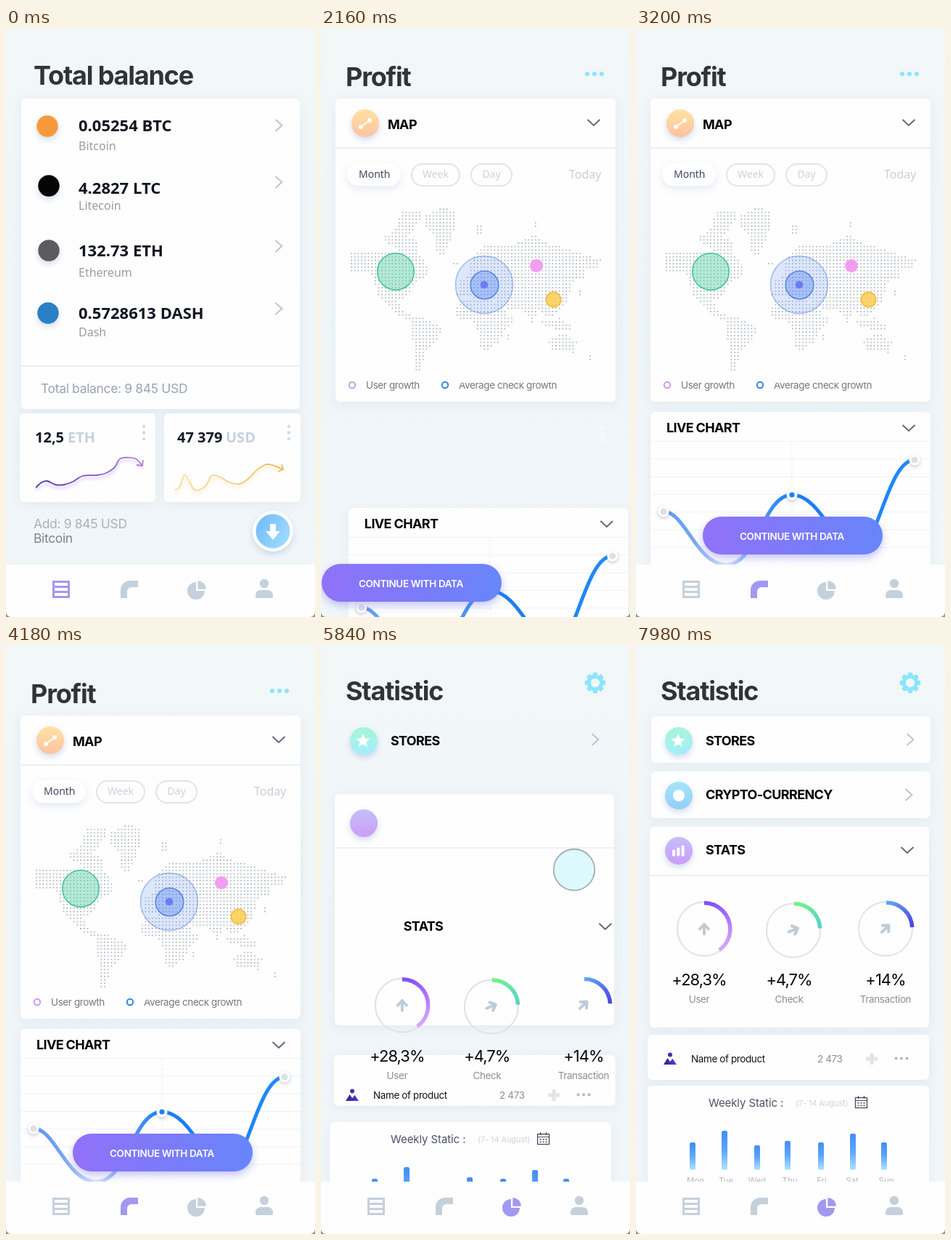
Write an HTML page with a canvas that moves like this. It is 426 px wide and 810 px high and loops after 8000 ms.

```html
<!DOCTYPE html>
<html lang="en">
<head>
<meta charset="utf-8">
<title>Wallet dashboard</title>
<style>
html, body { margin: 0; width: 100%; height: 100%; overflow: hidden; background: #8a8d8f; }
canvas { display: block; border-radius: 0 0 7px 7px; }
</style>
</head>
<body>
<canvas id="stage" width="426" height="810"></canvas>
<script>
const W = 426, H = 810, LOOP = 8000, TAU = Math.PI * 2;
const screen = document.getElementById('stage').getContext('2d');
const layer = document.createElement('canvas');
layer.width = W;
layer.height = H;
const c = layer.getContext('2d');

const INTER = 'Inter, "Liberation Sans", sans-serif';
const NOTO = '"Noto Sans", "Open Sans", sans-serif';
const MUTED = '#c5d0dd', ACTIVE = '#a298f2', CHEVRON = '#5f6b7b';

const clamp = v => Math.min(1, Math.max(0, v));
const ramp = (t, from, to) => clamp((t - from) / (to - from));
// Share of the way still to go on an ease-out slide
const remaining = (t, start) => (1 - ramp(t, start, start + 310)) ** 3;

// y is the middle of the capital letters
function text(s, x, y, size, color, { font = INTER, weight = 400, gap = 0, align = 'left' } = {}) {
  c.font = `${weight} ${size}px ${font}`;
  c.letterSpacing = gap + 'px';
  c.textAlign = align;
  c.fillStyle = color;
  c.fillText(s, x, y + size * 0.36);
}
const title = (s, y, x) => text(s, x, y, 36, '#303436', { weight: 700, gap: -1.2 });
const heading = (s, x, y) => text(s, x, y, 18, '#050505', { weight: 700, gap: -0.65 });
const small = (s, x, y, color, align) => text(s, x, y, 13.5, color, { gap: -0.4, align });

function shadow(color, blur, dy) {
  c.shadowColor = color;
  c.shadowBlur = blur;
  c.shadowOffsetY = dy;
}
const noShadow = () => shadow('transparent', 0, 0);

function at(x, y, draw) {
  c.save();
  c.translate(x, y);
  draw();
  c.restore();
}

function box(x, y, w, h, r, fill) {
  c.beginPath();
  c.roundRect(x, y, w, h, r);
  c.fillStyle = fill;
  c.fill();
}

function card(x, y, w, h) {
  shadow('rgba(120,155,190,.13)', 14, 3);
  box(x, y, w, h, 6, '#fefefe');
  noShadow();
}

function dot(x, y, r, fill, stroke, width = 1.5) {
  c.beginPath();
  c.arc(x, y, r, 0, TAU);
  if (fill) { c.fillStyle = fill; c.fill(); }
  if (stroke) { c.strokeStyle = stroke; c.lineWidth = width; c.stroke(); }
}

function line(points, color, width = 1.8) {
  c.beginPath();
  points.forEach(([x, y]) => c.lineTo(x, y));
  c.strokeStyle = color;
  c.lineWidth = width;
  c.stroke();
}

function gradient(x0, y0, x1, y1, ...colors) {
  const g = c.createLinearGradient(x0, y0, x1, y1);
  colors.forEach((color, i) => g.addColorStop(i / (colors.length - 1), color));
  return g;
}

const chevronRight = (x, y) => line([[x - 4.5, y - 8], [x + 4.5, y], [x - 4.5, y + 8]], '#b9c3d3');
const chevronDown = (x, y) => line([[x - 8.5, y - 4], [x, y + 4], [x + 8.5, y - 4]], CHEVRON, 2);
const rule = (x, y, w, color = '#eaf0f4', h = 2) => box(x, y, w, h, 0, color);

function badge(x, y, r, top, bottom) {
  shadow('rgba(110,140,200,.3)', 8, 4);
  dot(x, y, r, gradient(x, y - r, x, y + r, top, bottom));
  noShadow();
}

function background() {
  c.clearRect(0, 0, W, H);
  box(0, 0, W, H, 0, gradient(0, 0, 0, H, '#f2f7f8', '#eff5f8', '#f1f6f9'));
}

// Catmull-Rom curve through a few points
function spline(p) {
  c.beginPath();
  c.moveTo(...p[0]);
  for (let i = 0; i < p.length - 1; i++) {
    const a = p[i - 1] || p[i], b = p[i], d = p[i + 1], e = p[i + 2] || d;
    c.bezierCurveTo(b[0] + (d[0] - a[0]) / 6, b[1] + (d[1] - a[1]) / 6,
      d[0] - (e[0] - b[0]) / 6, d[1] - (e[1] - b[1]) / 6, d[0], d[1]);
  }
}

function sparkline(points, paint, glow, tip) {
  spline(points);
  c.strokeStyle = paint;
  c.lineWidth = 1.8;
  shadow(glow, 4, 4);
  c.stroke();
  noShadow();
  line(tip, paint);
}

const coins = [
  ['0.05254 BTC', 'Bitcoin', 134, 162, 134, 57, 135, '#f7993a'],
  ['4.2827 LTC', 'Litecoin', 220, 244, 212, 59, 217, '#050505'],
  ['132.73 ETH', 'Ethereum', 306, 336, 300, 59, 306, '#5c5c5e'],
  ['0.5728613 DASH', 'Dash', 392, 418, 386, 58, 392, '#2b7fc4']
];

function amountCard(x, w, textX, amount, unit, unitX, dotsX) {
  card(x, 530, w, 122);
  const style = { font: NOTO, weight: 600 };
  text(amount, textX, 563, 20, '#151a2a', style);
  text(unit, unitX, 563, 20, '#c6d1df', style);
  for (let i = 0; i < 3; i++) dot(dotsX, 548 + i * 8.5, 2.2, '#d3dae3');
}

function balancePage() {
  background();
  title('Total balance', 65, 38);
  card(21, 97, 384, 427);
  for (const [amount, name, y, nameY, arrowY, x, iconY, color] of coins) {
    badge(x, iconY, 14.7, color, color);
    text(amount, 100, y, 22, '#101522', { font: NOTO, weight: 600 });
    text(name, 100, nameY, 16, '#9a9ca1', { font: NOTO });
    chevronRight(376, arrowY);
  }
  rule(21, 464, 384);
  text('Total balance: 9 845 USD', 48, 496, 17.5, '#9aa3b1', { gap: -0.35 });

  amountCard(19, 187, 40, '12,5', 'ETH', 85, 190);
  amountCard(218, 188, 236, '47 379', 'USD', 303, 390);
  sparkline([[41, 632], [49, 625], [57, 623], [68, 628], [80, 628], [92, 624], [106, 616],
    [125, 615], [138, 612], [150, 604], [158, 592], [178, 592], [188, 602]],
    gradient(41, 0, 188, 0, '#46389a', '#7a58c8', '#b47fd6'), 'rgba(170,120,255,.5)',
    [[189, 594], [188, 602], [180, 601]]);
  sparkline([[233, 636], [240, 630], [247, 615], [260, 635], [275, 630], [283, 616], [294, 617],
    [308, 625], [322, 627], [335, 619], [348, 606], [362, 600], [382, 607]],
    gradient(233, 0, 382, 0, '#f9df98', '#f8cf7a', '#f3b45a'), 'rgba(250,205,120,.4)',
    [[380, 600], [382, 607], [375, 610]]);

  text('Add: 9 845 USD', 38, 682, 17.5, '#a9b1bd', { gap: -0.35 });
  text('Bitcoin', 38, 702, 17.5, '#7a8496', { gap: -0.35 });
  badge(368, 692, 28, '#fff', '#fff');
  dot(368, 692, 23.5, gradient(345, 680, 391, 704, '#76bcff', '#9fdcff'));
  box(364, 682, 8, 12, 1, '#fff');
  c.beginPath();
  c.moveTo(358, 692);
  c.lineTo(378, 692);
  c.lineTo(368, 704);
  c.fill();
}

// Rough land outlines, filled with a grid of dots
const land = new Path2D([
  'M40 309 85 310 105 306 128 300 140 318 150 338 128 352 120 370 105 373 112 388 129 398 124 403 104 394 76 365 74 345 64 334 40 334Z',
  'M112 252 142 250 135 268 120 285 136 300 118 305 90 298 85 287 102 278Z',
  'M147 256 165 247 187 252 186 275 176 297 168 315 160 308 155 285 140 266Z',
  'M123 400 140 397 165 411 164 425 150 438 142 452 137 473 130 471 130 440 122 415Z',
  'M187 368 192 347 205 340 207 318 222 300 262 300 292 284 310 295 340 303 387 320 380 333 362 330 366 345 350 345 340 374 330 389 312 400 302 386 291 407 280 388 255 385 232 370Z',
  'M192 376 215 370 245 378 258 395 269 397 252 418 245 432 230 443 221 443 216 415 208 404 190 402 183 388Z',
  'M300 401 330 399 350 412 338 416 312 412Z',
  'M312 431 335 418 353 432 350 447 318 443Z',
  'M213 272 225 268 223 284 214 284ZM292 264 300 268 299 277 291 276ZM180 319 190 321 185 330ZM354 358 360 362 354 374ZM257 421 263 424 257 433ZM366 455 374 448 371 457Z'
].join(''));

const worldMap = (() => {
  const dots = new Path2D();
  for (let y = 249; y < 474; y += 4.7) {
    for (let x = 42; x < 390; x += 4.7) {
      if (c.isPointInPath(land, x, y)) dots.rect(x - 0.9, y - 0.9, 1.8, 1.8);
    }
  }
  return dots;
})();

function mapCard() {
  card(20, 97, 386, 417);
  badge(61, 131, 19, '#ffe2a2', '#ffc2a0');
  line([[55, 136], [67, 127]], '#fff', 2);
  dot(55, 136, 3, '#fff');
  dot(67, 127, 3, '#fff');
  heading('MAP', 92, 133);
  chevronDown(376, 130);
  rule(20, 164, 386);

  shadow('rgba(120,150,190,.2)', 12, 4);
  box(36, 186, 74, 31, 16, '#fff');
  noShadow();
  text('Month', 52, 201, 14, '#42495c', { font: NOTO });
  for (const [s, x, w] of [['Week', 125, 66], ['Day', 207, 56]]) {
    c.beginPath();
    c.roundRect(x, 187, w, 30, 15);
    c.strokeStyle = '#e0e5ec';
    c.lineWidth = 2;
    c.stroke();
    text(s, x + w / 2, 201, 14, '#cdd2dc', { font: NOTO, align: 'center' });
  }
  text('Today', 342, 201, 16, '#c9ced8', { font: NOTO });

  c.fillStyle = '#b6bac4';
  c.fill(worldMap);
  dot(103, 335, 25.3, 'rgba(75,205,160,.42)', '#40c597');
  dot(225, 353, 39.5, 'rgba(90,140,245,.2)', 'rgba(80,130,225,.5)');
  dot(225.5, 353.5, 19.3, 'rgba(80,130,240,.38)', '#5585e2');
  dot(225, 353, 5.3, '#6a7cf0');
  dot(297, 327, 9, '#f39cf0');
  dot(320.5, 373.5, 10.3, 'rgba(251,205,80,.85)', '#efbb3c');

  dot(43, 491, 4.2, null, '#cf9bea', 2);
  small('User growth', 62, 491, '#74787e');
  dot(171, 491, 4.2, null, '#2f86e6', 2);
  c.save();
  c.beginPath();
  c.rect(186, 487.8, 150, 20);
  c.clip();
  small('Average check growth', 190, 491, '#74787e');
  c.restore();
}

function knob(x, y, r, color) {
  shadow('rgba(80,110,150,.35)', 5, 2);
  dot(x, y, 7.5, '#fff');
  noShadow();
  dot(x, y, r, color);
}

function liveChart() {
  card(20, 528, 386, 290);
  heading('LIVE CHART', 42, 550);
  chevronDown(376, 550);
  for (let i = 0; i < 8; i++) rule(20, 568 + i * 24.3, 386, '#eef1f4', 1);
  c.setLineDash([3, 3]);
  line([[215, 570], [215, 738]], '#e6eaee', 1);
  c.setLineDash([]);
  c.strokeStyle = gradient(38, 0, 384, 0, '#5a97f0', '#7ba5f4', '#dfe7fc', '#5c9df2', '#1a7ef5',
    '#1a7ef5', '#1c83f5', '#1f87f5', '#228af5');
  c.lineWidth = 5;
  c.stroke(new Path2D('M38 665C68 665 83 738 125 738S175 642 215 642S276 720 304 720S347 594 384 594'));
  knob(38, 665, 4.5, '#dfe0e1');
  knob(215, 642, 3.6, '#1f80ee');
  knob(384, 594, 4.5, '#dfe0e1');
}

function continueButton() {
  shadow('rgba(110,110,240,.4)', 12, 5);
  box(92, 672, 248, 52, 26, gradient(92, 0, 340, 0, '#9171f8', '#6785fa'));
  noShadow();
  text('CONTINUE WITH DATA', 215, 699, 13.5, '#fff', { weight: 600, gap: -0.35, align: 'center' });
}

function profitPage(t) {
  const k = remaining(t, 2085);
  background();
  title('Profit', 67, 34);
  for (let i = 0; i < 3; i++) dot(367 + i * 10, 63, 3.1, '#8fe4fb');
  mapCard();
  const fade = 0.8 * (1 - ramp(t, 2080, 2260));
  for (let i = 0; i < 3; i++) dot(388, 550 + i * 8, 3.6, `rgba(255,255,255,${fade})`);
  at(41 * k, 303 * k, liveChart);
  nav(1, 170 * k);
  at(-209 * k, 149 * k, continueButton);
}

function gear(x, y) {
  at(x, y, () => {
    for (let i = 0; i < 8; i++) {
      box(-3.2, -14.2, 6.4, 8, 1.5, '#8be5fc');
      c.rotate(TAU / 8);
    }
    dot(0, 0, 8.7, null, '#8be5fc', 5);
  });
}

function star(x, y) {
  c.beginPath();
  for (let i = 0; i < 10; i++) {
    const r = i % 2 ? 4.6 : 10, a = i * TAU / 10 - TAU / 4;
    c.lineTo(x + r * Math.cos(a), y + r * Math.sin(a));
  }
  c.fillStyle = '#fff';
  c.fill();
}

function arrow(x, y, angle) {
  at(x, y, () => {
    c.rotate(angle);
    c.lineCap = c.lineJoin = 'round';
    line([[0, 7], [0, -5]], '#bfcbd9', 4);
    line([[-6, 0], [0, -6.5], [6, 0]], '#bfcbd9', 4);
  });
}

function arc(x, y, sweep, from, to) {
  const r = 35.8, end = sweep - TAU / 4;
  c.beginPath();
  c.arc(x, y, r, -TAU / 4, end);
  c.strokeStyle = gradient(x, y - r, x + r * Math.cos(end), y + r * Math.sin(end), from, to);
  c.lineWidth = 5.5;
  c.stroke();
}

function statsContent() {
  heading('STATS', 96, 282);
  chevronDown(374, 282);
  dot(94, 390.5, 37, null, '#dfe2e5', 2);
  dot(217, 392.5, 37, null, '#dfe2e5', 2);
  arc(94, 390.5, 2.52, '#7f4ff2', '#dca6ff');
  arc(218, 391.5, 1.52, '#72f584', '#58d2c8');
  arc(345, 390, 1.52, '#62a8f8', '#4a44e4');
  arrow(94, 390.5, 0);
  arrow(217, 392, 1.2);
  arrow(344, 390, 0.8);
  const stats = [['+28,3%', 'User', 87], ['+4,7%', 'Check', 211], ['+14%', 'Transaction', 344]];
  for (const [value, label, x] of stats) {
    text(value, x, 460, 22, '#080808', { gap: -1, align: 'center' });
    small(label, x, 487, '#8b8e92', 'center');
  }
}

function productRow() {
  const ink = gradient(38, 0, 56, 0, '#25257f', '#5a3be0');
  dot(47, 563.5, 3, ink);
  c.beginPath();
  [[38, 577], [43.5, 568], [47, 573], [50.5, 569], [56, 577]].forEach(p => c.lineTo(...p));
  c.fill();
  small('Name of product', 76, 569, '#141414');
  small('2 473', 250, 569, '#8b8e92');
  box(317, 566.5, 16, 5, 0, '#e2e4e8');
  box(322.5, 561, 5, 16, 0, '#e2e4e8');
  for (let i = 0; i < 3; i++) dot(358.5 + i * 7.5, 568.5, 2, '#b2b6bd');
}

const week = [['Mon', 78, 82, 684], ['Tue', 122, 124, 668], ['Wed', 167, 167, 688], ['Thu', 209, 212, 682],
  ['Fri', 255, 256, 684], ['Sat', 299, 298, 672], ['Sun', 342, 345, 684]];

function weekCard() {
  card(16, 606, 388, 200);
  text('Weekly Static :', 100, 630, 15, '#4c5268', { gap: -0.1 });
  text('(7- 14 August)', 220, 630, 11, '#cfd4df', { gap: -0.1 });
  c.strokeStyle = '#454a60';
  c.lineWidth = 1.3;
  c.strokeRect(302.5, 622.5, 16, 14);
  line([[302, 626.5], [319, 626.5]], '#454a60', 1);
  line([[306.5, 620], [306.5, 624]], '#454a60', 1.3);
  line([[314.5, 620], [314.5, 624]], '#454a60', 1.3);
  for (let i = 0; i < 6; i++) box(305.5 + (i % 3) * 4, 629 + (i > 2) * 3.5, 2, 1.6, 0, '#454a60');
  for (const [day, x, labelX, top] of week) {
    box(x - 4, top, 8, 722 - top, 2.5, gradient(0, top, 0, 722, '#428cf6', '#5ea6f8', '#b2e4fd'));
    text(day, labelX, 736.5, 11.5, '#b4b9c2', { align: 'center' });
  }
}

function statisticPage(t) {
  const k = remaining(t, 5765), shown = ramp(t, 5850, 5980);
  background();
  title('Statistic', 63, 34);
  gear(378, 52);

  c.globalAlpha = shown;
  card(21, 98, 385, 64);
  card(21, 174, 385, 64);
  badge(59, 207, 19, '#a6e6fb', '#93cdf8');
  dot(59, 207, 8, '#fff');
  heading('CRYPTO-CURRENCY', 96, 206);
  chevronRight(376, 206);
  c.globalAlpha = 1;
  badge(59, 132, 19, '#a6f5d8', '#a4eefb');
  star(58, 132);
  heading('STORES', 96, 132);
  chevronRight(378, 130);

  card(19, 250 - 103 * k, 385, 276 + 96 * k);
  rule(19, 316 - 87 * k, 385, '#eff0f6');
  at(0, -87 * k, () => {
    badge(59, 283, 19, '#c6bdf9', '#cc9df9');
    c.globalAlpha = shown;
    [9, 12, 15].forEach((h, i) => box(50 + i * 6.3, 290.5 - h, 4, h, 1.5, '#fff'));
  });

  card(16 + 4 * k, 536 + 64 * k, 388, 62 + 18 * k);
  at(-9 * k, 115 * k, () => {
    productRow();
    weekCard();
  });
  // The third ring grows into place on its own
  dot(344 + 11.5 * k, 390.5 - 187 * k, 37 - 20 * k,
    `rgba(222,249,254,${clamp(k * 2.3)})`, k > 0.05 ? '#a4adb2' : '#dfe2e5', 1.8);
  at(41 * k, 241 * k, statsContent);
  nav(2, 0);
}

function nav(active, drop) {
  const tint = i => i === active ? ACTIVE : MUTED;
  at(0, drop, () => {
    box(0, 738, W, 72, 0, '#fefefe');
    c.strokeStyle = tint(0);
    c.lineWidth = 3;
    c.strokeRect(65.5, 761.5, 21, 21);
    line([[65, 768.5], [87, 768.5]], tint(0), 3);
    line([[65, 775.5], [87, 775.5]], tint(0), 3);

    c.fillStyle = tint(1);
    c.fill(new Path2D('M158 784V773A13 13 0 0 1 171 760H182V769H173A6 6 0 0 0 167 775V784Z'));

    c.fillStyle = tint(2);
    c.beginPath();
    c.moveTo(262, 774);
    c.arc(262, 774, 12, 0, TAU * 0.75);
    c.fill();
    c.beginPath();
    c.moveTo(264.3, 771.7);
    c.arc(264.3, 771.7, 11.5, -TAU / 4, 0);
    c.fill();

    dot(356, 764, 6.2, tint(3));
    box(344, 773, 24, 11, [7, 7, 2, 2], tint(3));
  });
}

function show(alpha) {
  screen.globalAlpha = alpha;
  screen.drawImage(layer, 0, 0);
}

function render(t) {
  const toProfit = ramp(t, 1920, 2080), toStatistic = ramp(t, 5600, 5760);
  if (toProfit < 1) {
    balancePage();
    nav(0, 72 * toProfit);
    show(1);
  }
  if (toProfit > 0 && toStatistic < 1) {
    profitPage(t);
    show(toProfit);
  }
  if (toStatistic > 0) {
    statisticPage(t);
    show(toStatistic);
  }
}

let start;
function tick(now) {
  start ??= now;
  render((now - start) % LOOP);
  requestAnimationFrame(tick);
}
render(0);
requestAnimationFrame(tick);
</script>
</body>
</html>
```
